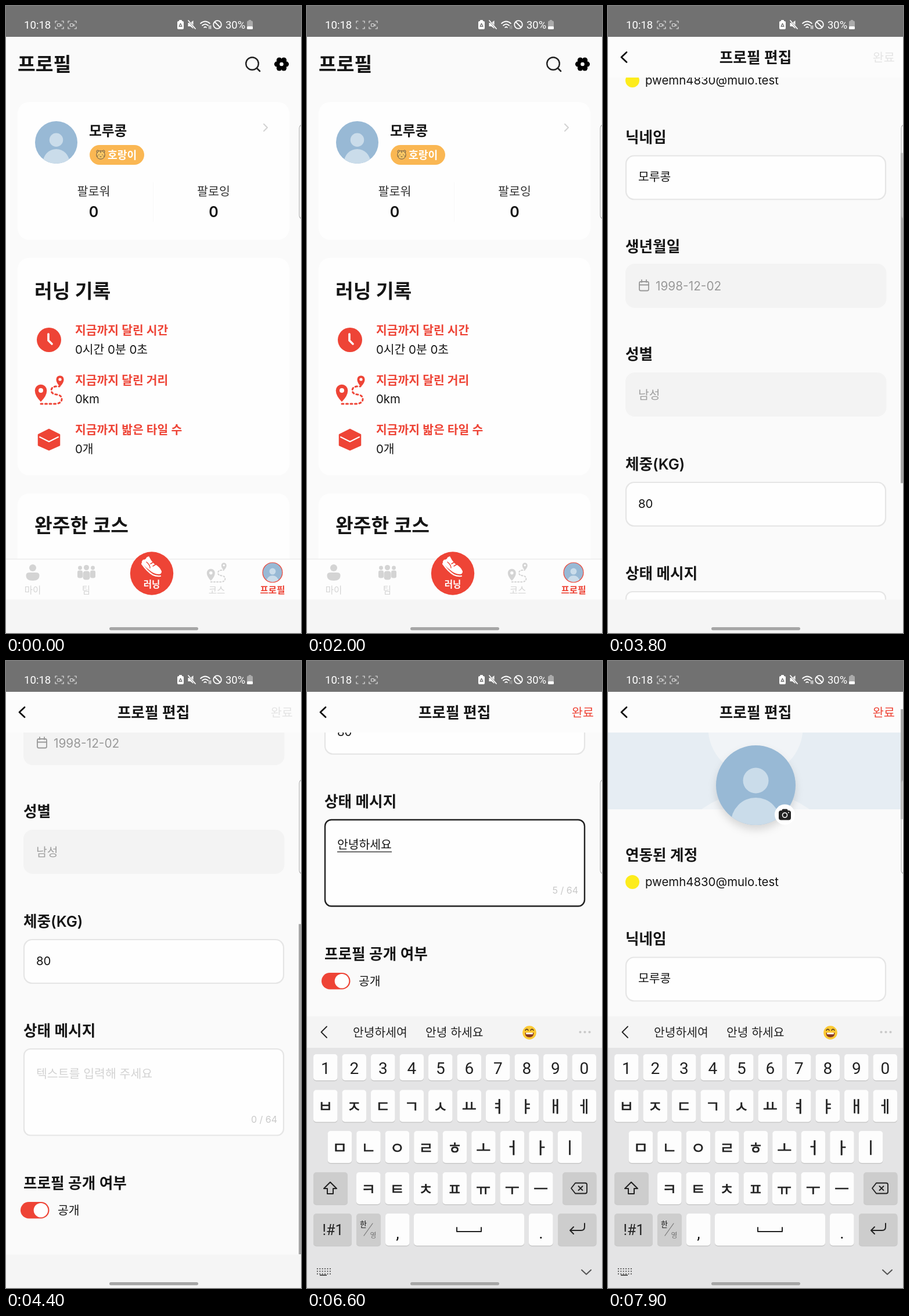
An HTML page for the animation above (8 s loop, 508x1078 px).

```html
<!DOCTYPE html>
<html lang="ko">
<head>
<meta charset="utf-8">
<title>프로필 편집</title>
<style>
html, body { margin: 0; width: 100%; height: 100%; overflow: hidden; background: #fafafa; }
svg#stage { display: block; width: 100%; height: 100%; }
text { font-family: Inter, "Noto Sans CJK KR", "Noto Sans CJK", sans-serif; fill: #151515; white-space: pre; }
.b { font-weight: 600; }
.mid { text-anchor: middle; }
.end { text-anchor: end; }
.rob { font-family: Roboto, "Noto Sans CJK KR", sans-serif; }
.jamo { stroke: #222; stroke-width: .022em; }
.line { fill: none; stroke: #222; stroke-width: 2; stroke-linecap: round; stroke-linejoin: round; }
.lift { filter: drop-shadow(0 8px 7px #0002); }
.pop { filter: drop-shadow(0 1px 2px #0004); }
</style>
</head>
<body>
<svg id="stage" viewBox="0 0 508 1078"></svg>
<script>
const LOOP = 8000, STEP = 100;
const RED = '#ee4436', PALE = '#d4d4d4', INK = '#222', BLUE = '#98b9d5';
const NICK = '모루콩', MAIL = 'pwemh4830@mulo.test';

// ---- drawing helpers: text is placed by its vertical centre ----
const text = (x, y, size, str, cls = '', fill = '') => {
  const drop = /[가-힣]/.test(str) ? .39 : .365;
  return `<text x="${x}" y="${y + size * drop}" font-size="${size}" class="${cls}"${fill && ` style="fill:${fill}"`}>${str}</text>`;
};
const rect = (x, y, w, h, r, fill, extra = '') =>
  `<rect x="${x}" y="${y}" width="${w}" height="${h}" rx="${r}" fill="${fill}" ${extra}/>`;
const circle = (x, y, r, fill, extra = '') => `<circle cx="${x}" cy="${y}" r="${r}" fill="${fill}" ${extra}/>`;
const line = (d, color = INK, w = 2, extra = '') =>
  `<path class="line" d="${d}" style="stroke:${color};stroke-width:${w}" ${extra}/>`;
const outline = (w, color = INK) => `stroke="${color}" stroke-width="${w}"`;
const group = (id, body) => `<g id="${id}">${body}</g>`;
const avatar = (x, y, r) => `<use href="#avatar" x="${x - r}" y="${y - r}" width="${2 * r}" height="${2 * r}"/>`;
const pin = (x, y, r, h) => `<path fill-rule="evenodd" d="M${x - r} ${y}a${r} ${r} 0 0 1 ${2 * r} 0q0 ${r * .9} ${-r} ${r * 1.9}` +
  `q${-r} ${-r} ${-r} ${-r * 1.9}zM${x - h} ${y}a${h} ${h} 0 0 0 ${2 * h} 0a${h} ${h} 0 0 0 ${-2 * h} 0z"/>`;
const route = (x, y, scale, color) => `<g transform="translate(${x} ${y}) scale(${scale})" fill="${color}">` +
  pin(43, 7, 6.6, 2.6) + pin(10, 26, 10.3, 4) +
  line('M10 49H35q11-1 11-8t-9-8q-9-1-9-7t8-7h6', color, 3, 'stroke-dasharray="3 4.5"') + '</g>';

const defs = `<defs>
  <clipPath id="round"><circle cx="68.5" cy="68.5" r="68.5"/></clipPath>
  <g id="face" fill="#cadcea"><circle cx="68.5" cy="60.5" r="22"/><ellipse cx="68.5" cy="134" rx="43" ry="44"/></g>
  <symbol id="avatar" viewBox="0 0 137 137"><g clip-path="url(#round)">
    <rect width="137" height="137" fill="${BLUE}"/><use href="#face"/></g></symbol>
</defs>`;

// ---- profile page ----
const card = (y, h) => rect(20, y, 468, h, 20, '#fefefe');
const record = (y, label, value) => text(119, y, 20.4, label, 'b', RED) + text(119, y + 33, 20.4, value);
const lobes = [0, 1, 2, 3, 4, 5].map(i =>
  circle(474.5 + 7.9 * Math.cos(i * Math.PI / 3), 100 + 7.9 * Math.sin(i * Math.PI / 3), 4.7, '#000')).join('');
const tiger = circle(158, 250, 2, '#f8c765', outline(1, '#654')) + circle(168, 250, 2, '#f8c765', outline(1, '#654')) +
  circle(163, 256, 7.2, '#f8c765', outline(1, '#654')) +
  line('M163 250v2M160 255.5v.5M166 255.5v.5M162 259h2M157 258h1M168 258h1', '#543', 1.1);
const follow = (x, label) => text(x, 318, 20.6, label, 'mid', '#333') + text(x, 354, 25, '0', 'b mid');

const profileBody =
  text(20, 99, 33.4, '프로필', 'b') +
  circle(424, 99, 10.8, 'none', outline(2.4)) + line('M432 107l5 5', INK, 2.6) +
  lobes + circle(474.5, 100, 9, '#000') + circle(474.5, 100, 3.3, '#fff') +
  card(165, 237) + avatar(86.5, 234.5, 36.5) + text(143, 214, 23.7, NICK, 'b') +
  rect(144, 239, 94, 34, 17, '#fab753') + tiger + text(175, 256, 18.2, '호랑이', 'b', '#fff') +
  line('M444 203l6 6-6 6', '#d2d2d2', 2) + rect(253, 303, 1, 68, 0, '#f7f7f7') +
  follow(151, '팔로워') + follow(357.5, '팔로잉') +
  card(433, 374) + text(49, 489, 33.4, '러닝 기록', 'b') +
  circle(74, 574, 21, RED) + line('M73 564v11l6 6', '#fff', 3.6) +
  record(557, '지금까지 달린 시간', '0시간 0분 0초') +
  route(50, 635, 1, RED) + record(643, '지금까지 달린 거리', '0km') +
  `<path d="M74 728l18 9v18l-18 8-18-8v-18z" fill="${RED}" stroke="${RED}" stroke-width="2.5" stroke-linejoin="round"/>` +
  line('M58 741l16 8 16-8', '#fff', 2) + record(728, '지금까지 밟은 타일 수', '0개') +
  card(838, 170) + text(49, 892, 33.4, '완주한 코스', 'b') +
  text(254, 962, 20.5, '완주한 코스가 없어요', 'mid', '#d0d0d0');

const member = (x, top, w, h) => circle(x, top, w * .38, PALE) + rect(x - w / 2, top + w * .5, w, h, w * .35, PALE);
const shoe = `<path fill="#fff" d="M236 952q5 0 6-4l4-2q3 7 9 13 10 5 13 13 0 5-5 5-8 0-16-7-9-7-13-12-1-3 2-6z"/>` +
  line('M234 959q9 13 19 19 6 3 13 2', '#fff', 2.2) +
  line('M249 959l5-3M253 963l5-3M242 956q6 5 6 10', RED, 1.5);
const nav = rect(0, 951, 508, 70, 0, '#fdfdfd') + rect(0, 950.5, 508, 1, 0, '#e4e4e4') +
  circle(46, 966, 6, PALE) + `<path fill="${PALE}" d="M34.5 979q0-5 6-5h11q6 0 6 5 0 9-11.5 9t-11.5-9z"/>` +
  member(127.5, 966, 9, 13) + member(149.5, 966, 9, 13) + member(138.5, 965.5, 12, 15) +
  route(346, 957, .68, PALE) +
  text(46, 1004, 15.6, '마이', 'mid', PALE) + text(138, 1004, 15.6, '팀', 'mid', PALE) +
  text(363, 1004, 15.6, '코스', 'mid', PALE) + text(459, 1004, 15.6, '프로필', 'b mid', RED) +
  circle(251, 975.5, 37.2, RED) + shoe + text(251, 994, 15.6, '러닝', 'b mid', '#fff') +
  avatar(459, 974, 17) + circle(459, 974, 17, 'none', outline(1.2, RED));

// ---- typing: time, composed text, pressed key ----
const typing = [
  [5400, '아', 'ㅏ'], [5500, '안', 'ㄴ'], [5600, '안ㄴ', 'ㄴ'], [5700, '안녀', 'ㅕ'], [5800, '안녕', 'ㅇ'],
  [5900, '안녕하', 'ㅏ'], [6000, '안녕핫', 'ㅅ'], [6100, '안녕하세', 'ㅔ'], [6200, '안녕하셍', 'ㅇ'],
  [6300, '안녕하세요', 'ㅛ'], [6400, '안녕하세요', ''], [LOOP + 1]
];
const states = typing.slice(0, -1);
const counter = n => text(467, 1468, 16, `${n} / 64`, 'end', '#c9c9c9');
const caret = x => rect(x, 1377, 1.4, 26, 0, INK);
const typed = states.map(([, str], i) => group('typed' + i,
  text(52, 1389, 20.4, str) + rect(52, 1401.5, 18.8 * str.length, 1.3, 0, INK) + counter(str.length))).join('');

// ---- edit page ----
const title = (y, str) => text(30, y, 25.6, str, 'b');
const field = (y, h = 75, r = 14) => rect(31, y, 447, h, r, '#fefefe', outline(2.2, '#e5e5e5'));
const locked = y => rect(30, y, 449.5, 76, 16, '#f3f3f3');

const editBody =
  `<svg y="123" width="508" height="220" viewBox="0 38.9 137 59.3" opacity=".2">
     <rect width="137" height="137" fill="${BLUE}"/><use href="#face"/></svg>` +
  `<g class="lift">${avatar(254.5, 301.5, 68.5)}</g>` + circle(304.5, 352, 17.5, '#fff') +
  rect(294, 345, 21, 16.5, 4, INK) + rect(299.5, 342.5, 10, 6, 2, INK) +
  circle(304.5, 353, 4, 'none', outline(1.6, '#fff')) + circle(311, 348.5, 1, '#fff') +
  title(421, '연동된 계정') + circle(42, 468, 12, '#fdec1c') + text(64, 468, 20.4, MAIL) +
  title(565, '닉네임') + field(597.5) + text(52, 633, 20.4, NICK) +
  title(753, '생년월일') + locked(783) +
  rect(54, 814, 16, 15.5, 2.5, 'none', outline(1.8, '#999')) + line('M54 819.5h16M58 811v4M66 811v4', '#999', 1.8) +
  text(82, 821, 20.8, '1998-12-02', '', '#999') +
  title(938, '성별') + locked(970) + text(52, 1008, 20.4, '남성', '', '#a0a0a0') +
  title(1127, '체중(KG)') + field(1159) + text(52, 1196, 20.4, '80') +
  title(1315, '상태 메시지') + field(1347, 148.5, 11) +
  group('focus', rect(31, 1347, 447, 148.5, 11, 'none', outline(2.4))) +
  group('hint', text(52, 1389, 20.5, '텍스트를 입력해 주세요', '', '#d3d3d3') + counter(0)) +
  group('firstCaret', caret(52)) + typed + group('caret', caret(0)) +
  title(1577, '프로필 공개 여부') + rect(25, 1610, 49.5, 28.5, 14.2, RED) + circle(60, 1624.2, 12.3, '#fff') +
  text(89, 1624, 20.4, '공개');

const editHeader = rect(0, 53, 508, 70, 0, '#fcfcfc') + line('M32 79.5l-9 8.5 9 8.5', '#111', 2.8) +
  text(254, 88, 25.7, '프로필 편집', 'b mid') +
  group('doneOff', text(494, 88, 20.8, '완료', 'end', '#e4e4e4')) + group('doneOn', text(494, 88, 20.8, '완료', 'end', RED));

// ---- keyboard ----
const PITCH = 49.5, KEY = 41.5, spots = {};
const key = (x, y, w, h = 55, fill = '#fdfdfd') => rect(x, y + 1.5, w, h, 5, '#c9c9c9') + rect(x, y, w, h, 5, fill);
const keyRow = (x, y, chars, size, h = 55, cls = 'jamo') => [...chars].map((c, i) => {
  const left = x + PITCH * i;
  spots[c] = { x: left + KEY / 2, y };
  return key(left, y, KEY, h) + text(left + KEY / 2, y + h / 2 + 1, size, c, 'mid ' + cls, INK);
}).join('');
const dark = (x, y, w) => key(x, y, w, 55, '#cdcdcd');
const tool = (x, icon) => circle(x, 637, 19.5, '#e8e8e8') + icon;
const dots = color => [470.5, 478.5, 486.5].map(x => circle(x, 638, 2.1, color)).join('');
const cog = 'M' + Array.from({ length: 16 }, (_, i) => {
  const a = i * Math.PI / 8, r = i % 2 ? 8 : 10.3;
  return `${(403 + r * Math.cos(a)).toFixed(1)} ${(637 + r * Math.sin(a)).toFixed(1)}`;
}).join('L') + 'z';
const tinyKeys = (x, y, gap, cols) => Array.from({ length: cols * 3 }, (_, i) =>
  rect(x + i % cols * gap, y + (i / cols | 0) * gap, 1.8, 1.8, 0, '#444')).join('');

const tools =
  tool(44, circle(44, 637, 9.8, 'none', outline(1.8)) + circle(40.5, 634.5, 1.4, INK) +
    circle(47.5, 634.5, 1.4, INK) + line('M39.5 639.5q4.5 5 9 0', INK, 1.6)) + circle(60, 622, 4, '#f0602c') +
  tool(134, rect(126, 628, 16.5, 19, 3, 'none', outline(1.8)) + rect(130, 627.5, 8.5, 5, 1, '#e8e8e8', outline(1.8))) +
  tool(223, rect(213.5, 628, 18, 13.5, 3, 'none', outline(1.8)) + tinyKeys(217, 631, 3, 4) +
    line('M217 646h14q4 0 4-4v-9', INK, 1.8)) +
  tool(313, rect(309.5, 627, 7, 13, 3.5, 'none', outline(1.8)) + line('M306 636q0 8 7 8t7-8M313 644v3', INK, 1.8)) +
  tool(403, line(cog, INK, 1.7) + circle(403, 637, 3, 'none', outline(1.6))) + dots(INK);

const grin = circle(383, 639, 11.8, '#fcc934') + line('M376 635q2.5-4 5 0M385 635q2.5-4 5 0', '#5a3a1a', 1.5) +
  '<path d="M375.5 639h15q0 8-7.5 8t-7.5-8z" fill="#8a3a22"/>' + rect(377, 639, 12, 2.8, 1, '#fff');
const suggestions = line('M34 628.5l-9.5 9.5 9.5 9.5', INK, 1.8) +
  text(79, 638, 20.4, '안녕하세여', '', INK) + text(204, 638, 20.4, '안녕 하세요', '', INK) + grin + dots('#c8c8c8');

const keys =
  keyRow(11, 676, '1234567890', 28, 45, 'rob') + keyRow(11, 737.5, 'ㅂㅈㄷㄱㅅㅛㅕㅑㅐㅔ', 27.5) +
  keyRow(35.7, 808, 'ㅁㄴㅇㄹㅎㅗㅓㅏㅣ', 27.5) + keyRow(85, 879, 'ㅋㅌㅊㅍㅠㅜㅡ', 27.5) +
  dark(11, 879, 59) + line('M40 896l11 11h-6v9h-10v-9h-6z') +
  dark(440, 879, 58.5) + line('M462 897.5h17q3 0 3 3v12q0 3-3 3h-17l-7-9zM467.5 903l7 7m0-7l-7 7', INK, 1.9) +
  dark(11, 950, 66) + text(44.5, 978, 25, '!#1', 'rob mid', INK) +
  dark(85, 950, 42) + text(97, 968, 13, '한', 'mid') + line('M98 988l15-21', '#777', 1.2) + text(114, 987, 12, '영', 'mid', '#777') +
  key(135, 950, 41.5) + text(156, 983, 28, ',', 'rob mid') +
  key(184, 950, 190) + line('M258 974v7h42v-7', INK, 2) +
  key(382, 950, 41.5) + text(403, 983, 28, '.', 'rob mid') +
  dark(432, 950, 66.5) + line('M478 967v6q0 6-6 6h-19m6-6l-6 6 6 6', INK, 2) +
  tinyKeys(17, 1044, 4.4, 6) + rect(22, 1055, 12, 1.8, 0, '#444') + line('M473 1047l8 7.5 8-7.5', '#555', 2);

const popups = states.map(([, , c], i) => {
  if (!c) return '';
  const { x, y } = spots[c], left = Math.min(x - 38, 424);
  return group('popup' + i, rect(left, y - 109, 76, 99, 9, '#fdfdfd', 'class="pop"') +
    text(left + 38, y - 56, 41, c, 'mid jamo', INK));
}).join('');

const keyboard = rect(0, 611, 508, 60, 0, '#f4f4f4') + rect(0, 665, 508, 413, 0, '#e4e4e5') +
  group('tools', tools) + group('suggest', suggestions) + keys + popups;

// ---- system chrome ----
const brackets = x => line(`M${x} 29v-3h3M${x + 11} 26h3v3M${x + 14} 36v3h-3M${x + 3} 39h-3v-3`, '#e4e4e4', 1.2);
const cam = x => rect(x + 3.5, 30.5, 5, 4.5, 1, 'none', outline(1.1, '#e4e4e4')) + line(`M${x + 9} 32.5l2-1v3l-2-1`, '#e4e4e4', .8);
const status = rect(0, 0, 508, 53, 0, '#717171') + text(31, 32, 18.6, '10:18', 'rob', '#fff') +
  brackets(85) + group('camera', cam(85)) + brackets(107) + cam(107) +
  rect(295, 26, 11, 14, 2, '#fff') + rect(298, 24, 5, 3, 1, '#fff') + line('M298 35l2.5-5 2.5 5z', '#717171', 1.3) +
  '<path d="M313.5 29h4l5-4v14l-5-4h-4z" fill="#fff"/>' + line('M314 25l12 14', '#717171', 3) + line('M314 25l12 14', '#fff', 1.7) +
  line('M335 30q8-7 16 0M338 33.5q5-4.5 10 0M341 37q2-2 4 0', '#fff', 1.7) + group('traffic', line('M350 34v5M352.5 39v-5', '#fff', 1.3)) +
  circle(364, 32, 6.8, 'none', outline(1.8, '#fff')) + line('M359.5 27.5l9 9', '#fff', 1.8) +
  text(378, 32, 18.4, '30%', 'rob', '#fff') +
  rect(415, 25.5, 10, 14, 2, '#aaa') + rect(418, 24, 4, 2, 0, '#aaa') + rect(415, 35, 10, 5, 1.5, '#fff');

const stage = document.getElementById('stage');
stage.innerHTML = defs + rect(0, 0, 508, 1078, 0, '#fafafa') +
  group('profile', profileBody) + nav +
  group('edit', rect(0, 53, 508, 968, 0, '#fafafa') + group('form', editBody) + editHeader) +
  rect(0, 1020.5, 508, 58, 0, '#f5f5f5') +
  group('thumb', rect(504, 53, 4, 1, 0, '#a9a9a9', 'id="bar"')) +
  group('keyboard', keyboard) + status +
  rect(505, 204, 12, 162, 6, '#fdfdfd66', outline(1.2, '#b5b5b5')) +
  rect(178, 1068, 153, 5.2, 2.6, '#a6a6a6');

// ---- motion: every track is a pure function of loop time, shown at ten steps a second ----
const along = (...points) => t => {
  const next = points.findIndex(p => p[0] > t);
  if (next < 0) return points.at(-1)[1];
  if (next === 0) return points[0][1];
  const [t0, v0] = points[next - 1], [t1, v1] = points[next];
  const u = (t - t0) / (t1 - t0);
  return v0 + (v1 - v0) * u * u * (3 - 2 * u);
};
const track = (id, pose) => {
  const steps = LOOP / STEP;
  const frames = Array.from({ length: steps + 1 }, (_, i) => ({ ...pose(i * STEP), offset: i / steps, easing: 'step-end' }));
  document.getElementById(id).animate(frames, { duration: LOOP, iterations: Infinity });
};
const moveY = (id, y) => track(id, t => ({ transform: `translateY(${y(t)}px)` }));
const fade = (id, alpha) => track(id, t => ({ opacity: alpha(t) }));
const show = (id, from, to = LOOP + 1) => fade(id, t => +(t >= from && t < to));

const profileScroll = along([100, 0], [600, 78], [1300, 78], [1800, 0]);
const editScroll = along([3400, 0], [4200, 680], [4700, 680], [5100, 1074], [7000, 1074], [7900, 88]);
const keyboardDrop = along([4700, 467], [5000, 0]);

moveY('profile', t => -profileScroll(t));
moveY('form', t => -editScroll(t));
moveY('keyboard', keyboardDrop);
fade('edit', along([2800, 0], [2900, .15], [3000, .5], [3100, .81], [3200, 1]));

// The scroll bar shares the visible height with the whole form
const FORM = 1647;
track('bar', t => {
  const view = 967 - 409 * (1 - keyboardDrop(t) / 467);
  return { y: `${53 + editScroll(t) * view / FORM}px`, height: `${view * view / FORM}px` };
});
fade('thumb', along([3300, 0], [3400, 1], [4600, 1], [4900, 0], [7000, 0], [7100, 1]));

const START = typing[0][0];
show('focus', 4700);
show('hint', 0, START);
show('firstCaret', 4900, START);
show('doneOff', 0, START);
show('doneOn', START);
show('tools', 0, 5700);
show('suggest', 5700);
states.forEach(([from, , pressed], i) => {
  const to = typing[i + 1][0];
  show('typed' + i, from, to);
  if (pressed) show('popup' + i, from, to);
});
track('caret', t => {
  const now = states.findLast(s => s[0] <= t);
  return { opacity: now && t < 6600 ? 1 : 0, transform: `translateX(${52 + 18.8 * (now ? now[1].length : 0)}px)` };
});

const blinks = [1000, 1500, 2000, 2500, 3000, 3500, 3900, 4400, 4900, 5400, 6500, 7100];
const lit = t => +(blinks.filter(b => b <= t).length % 2 === 0);
fade('camera', lit);
fade('traffic', t => .35 + .65 * lit(t));
</script>
</body>
</html>
```
